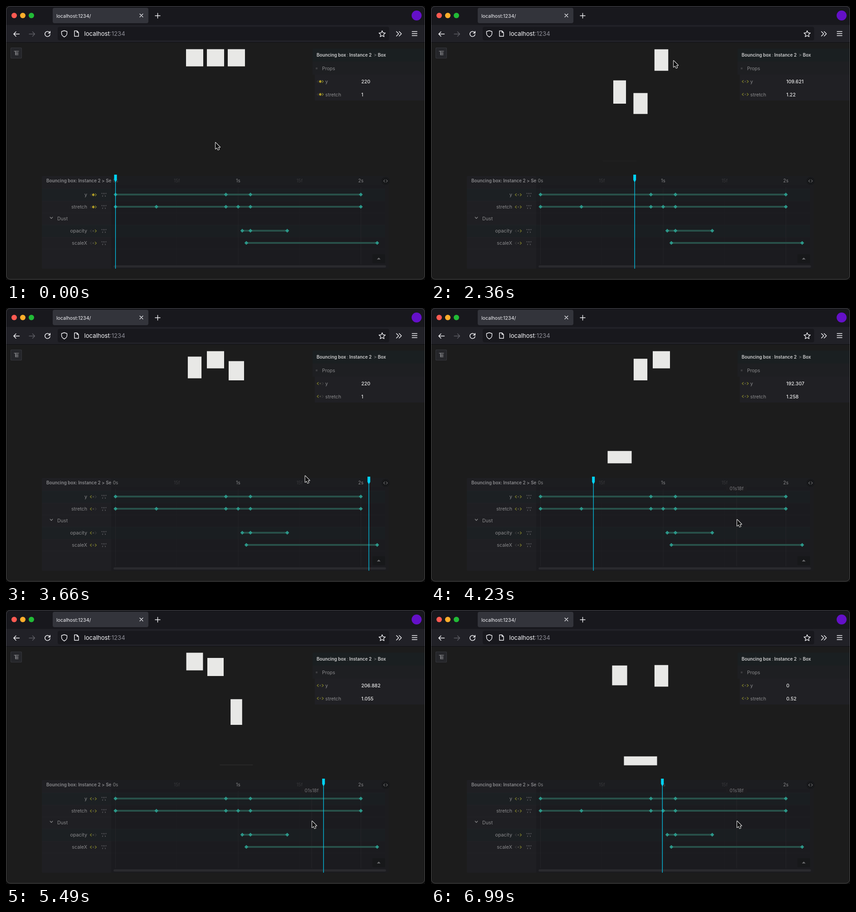
Animation of 924x606 px, one loop 7090 ms. Source, as an HTML page with a canvas:

```html
<!DOCTYPE html>
<html lang="en">
<head>
<meta charset="utf-8">
<title>Bouncing boxes</title>
<style>
  html, body { margin: 0; width: 100%; height: 100%; overflow: hidden; background: #0c0c0c; }
  canvas { display: block; }
</style>
</head>
<body>
<canvas id="stage" width="924" height="606"></canvas>
<script>
const ctx = document.getElementById('stage').getContext('2d');
const LOOP = 7090, STEP = 33.28, SEQUENCE = 2.2;
const ICON = '#f4f4f8', CYAN = '#00d4fb', TEAL = '#2c9789', LABEL = '#8b8b8d';

// ---- timing ----
function bezier([x1, y1, x2, y2], u) {
  const at = (a, b, s) => 3 * (1 - s) ** 2 * s * a + 3 * (1 - s) * s * s * b + s ** 3;
  let lo = 0, hi = 1;
  for (let i = 0; i < 24; i++) {
    const mid = (lo + hi) / 2;
    if (at(x1, x2, mid) < u) lo = mid; else hi = mid;
  }
  return at(y1, y2, lo);
}
const IN_OUT = [.5, 0, .5, 1];

// Each key: time, value, easing towards the next key.
const Y_KEYS = [[0, 220, [.588, 0, .98, .5]], [.9, 0], [1.1, 0, [.02, .5, .412, 1]], [2, 220]];
const STRETCH_KEYS = [[0, 1, [.35, .55, .65, 1]], [1 / 3, 1.26], [.9, 1.216], [1, .516],
                      [1.1, 1.65, [.2, .5, .5, 1]], [2, 1]];
const OPACITY_KEYS = [[1.0333, 0], [1.1, .12], [1.4, 0]];
const SCALE_KEYS = [[1.0667, 72], [2.1333, 112]];

function sample(keys, p) {
  if (p <= keys[0][0]) return keys[0][1];
  for (let i = 1; i < keys.length; i++) {
    const [t0, v0, ease = IN_OUT] = keys[i - 1], [t1, v1] = keys[i];
    if (p < t1) return v0 + (v1 - v0) * bezier(ease, (p - t0) / (t1 - t0));
  }
  return keys[keys.length - 1][1];
}

const boxes = [{ x: 416, start: 1067 }, { x: 462, start: 1597 }, { x: 508, start: 2095 }];
const phase = (start, t) => t < start ? 0 : (t - start) / 1000 % SEQUENCE;

const POINTER = [[0, 462, 302], [490, 462, 302], [960, 414.5, 121.5], [1130, 414.5, 121.5],
  [1550, 461, 122], [1640, 461, 122], [2060, 507, 121], [2130, 507, 121],
  [2360, 535, 121], [3090, 628, 179], [3290, 630, 184], [3930, 675, 468], [4230, 675, 468], [4500, 675, 467]];
function pointerAt(t) {
  const pick = i => sample(POINTER.map(k => [k[0], k[i]]), t);
  return [pick(1), pick(2)];
}

// ---- drawing helpers ----
function rect(x, y, w, h, color, radius = 0) {
  ctx.fillStyle = color;
  ctx.beginPath();
  ctx.roundRect(x, y, w, h, radius);
  ctx.fill();
}
function disc(x, y, r, color) {
  ctx.fillStyle = color;
  ctx.beginPath();
  ctx.arc(x, y, r, 0, 7);
  ctx.fill();
}
function stroke(d, color, width = 1.4, x = 0, y = 0) {
  ctx.save();
  ctx.translate(x, y);
  ctx.strokeStyle = color;
  ctx.lineWidth = width;
  ctx.lineCap = ctx.lineJoin = 'round';
  ctx.stroke(new Path2D(d));
  ctx.restore();
}
function fill(d, color, x = 0, y = 0) {
  ctx.save();
  ctx.translate(x, y);
  ctx.fillStyle = color;
  ctx.fill(new Path2D(d));
  ctx.restore();
}
function text(str, x, y, size, color, weight = 400, align = 'left') {
  ctx.font = `${weight} ${size}px Inter, sans-serif`;
  ctx.textAlign = align;
  ctx.fillStyle = color;
  ctx.fillText(str, x, y);
}
const diamond = (x, y, r, color) => fill(`M0 ${-r}L${r} 0 0 ${r} ${-r} 0Z`, color, x, y);

function keyControls(x, y, keys, p) {
  const tint = on => on ? '#85852a' : '#38383a';
  stroke('M-4 -2.5L-7 0 -4 2.5', tint(p > keys[0][0]), 1.2, x, y);
  stroke('M4 -2.5L7 0 4 2.5', tint(p < keys[keys.length - 1][0]), 1.2, x, y);
  if (keys.some(k => Math.abs(k[0] - p) < .001)) diamond(x, y, 3.4, '#b09c27');
  else diamond(x, y, 2, '#4b4b45');
}

// ---- parts ----
function browser() {
  rect(0, 0, 924, 606, '#0c0c0c');
  rect(0, 0, 924, 605, '#1c1c1c', 9);
  rect(0, 0, 924, 42, '#18181d', [9, 9, 0, 0]);
  rect(0, 42, 924, 38, '#212127');
  rect(0, 80, 924, 1, '#0f0f12');
  ['#ff5a52', '#ffae2b', '#21bb36'].forEach((c, i) => disc(18 + 19 * i, 21, 6, c));
  rect(103, 4, 211, 34, '#33343b', 4);
  text('localhost:1234/', 111, 25.5, 10.6, ICON);
  stroke('M-3.5 -3.5L3.5 3.5M3.5 -3.5L-3.5 3.5', ICON, 1.1, 298.5, 21);
  stroke('M-5.5 0H5.5M0 -5.5V5.5', ICON, 1.4, 334.5, 21.5);
  disc(905.5, 21, 11, '#6410c8');

  stroke('M6.5 0H-6M-1 -5L-6 0 -1 5', ICON, 1.5, 23, 62);
  stroke('M-6.5 0H6M1 -5L6 0 1 5', '#5d5d65', 1.4, 57.5, 62);
  stroke('M5.6 1A5.7 5.7 0 1 1 4 -4.2L5.6 -2.6M5.8 -6V-2H1.8', ICON, 1.5, 91.5, 62);
  rect(114, 46, 731, 30, '#18181d', 4);
  stroke('M0 -7L6 -5V-1C6 3 3 5.5 0 7C-3 5.5 -6 3 -6 -1V-5Z', ICON, 1.4, 128.5, 61.5);
  stroke('M-4.5 -6H1L4.5 -2.5V6H-4.5ZM1 -6V-2.5H4.5', ICON, 1.4, 155.5, 61);
  text('localhost', 172.5, 66, 13.2, '#fbfbfe');
  text(':1234', 172.5 + ctx.measureText('localhost').width, 66, 13.2, '#8d8d96');
  const star = Array.from({ length: 10 }, (_, i) => {
    const r = i % 2 ? 3.4 : 7.4, a = i * Math.PI / 5;
    return `${r * Math.sin(a)} ${-r * Math.cos(a)}`;
  });
  stroke(`M${star.join('L')}Z`, ICON, 1.3, 829.5, 62);
  stroke('M-5 -5L0 0 -5 5M1 -5L6 0 1 5', ICON, 1.5, 866, 61.5);
  stroke('M-5.5 -4.5H5.5M-5.5 0H5.5M-5.5 4.5H5.5', ICON, 1.4, 901, 61);

  rect(10, 92, 25, 24, '#34353a', 2);
  rect(11, 93, 23, 22, '#25262a', 2);
  stroke('M-5 -4H5M-2 -4V4M-2 -1H4M-2 1.5H4M-2 4H4', '#a0a0a3', 1, 23, 104);
}

function stageBoxes(t) {
  for (const { x, start } of boxes) {
    const p = phase(start, t);
    const width = sample(SCALE_KEYS, p);
    rect(x - width / 2, 342, width, 1.2, `rgba(232,232,230,${sample(OPACITY_KEYS, p)})`);
  }
  for (const { x, start } of boxes) {
    const p = phase(start, t), stretch = sample(STRETCH_KEYS, p);
    const bottom = 133.5 + (220 - sample(Y_KEYS, p)) * 210 / 220;
    const w = 38 / stretch, h = 38 * stretch;
    rect(x - w / 2, bottom - h, w, h, '#e8e8e6');
  }
}

function propsPanel(p) {
  rect(676, 94, 247, 29, '#1a1f21', [3, 0, 0, 0]);
  rect(676, 123, 247, 29, '#1e1f22');
  rect(681, 152, 242, 57, '#202024');
  text('Bouncing box', 685, 112, 9.8, '#cfcfd0', 600);
  text(':', 752, 112, 9.8, '#8b8b8d');
  text('Instance 2', 757, 112, 9.8, '#cfcfd0', 600);
  text('>', 811, 112, 9.8, '#8b8b8d');
  text('Box', 820, 112, 9.8, '#cfcfd0', 600);
  rect(683, 136, 4, 4, '#3a3a3d');
  text('Props', 697, 142, 10.5, LABEL);
  [['y', Y_KEYS], ['stretch', STRETCH_KEYS]].forEach(([name, keys], i) => {
    const y = 167 + 28.5 * i;
    keyControls(693, y, keys, p);
    text(name, 704, y + 4, 10.7, LABEL);
    text(String(+sample(keys, p).toFixed(3)), 783.5, y + 4, 10.6, '#ececec', 500);
  });
}

const timeX = s => 241.5 + 270.5 * s;
const ROWS = [['y', 417, Y_KEYS], ['stretch', 444, STRETCH_KEYS],
              ['opacity', 497, OPACITY_KEYS], ['scaleX', 524, SCALE_KEYS]];

function timeline(p, hover) {
  const headX = timeX(p);
  rect(79, 376, 765, 205, '#1c1c1f', 2);
  rect(79, 376, 153, 205, '#1f1f23', 2);
  rect(232, 376, 604, 205, '#1b1b1f');
  rect(232, 376, 604, 20, '#1c1d20');
  for (const y of [404, 484]) rect(79, y, 757, 27, 'rgba(26,34,36,.45)');
  for (const y of [404, 431, 457, 484, 511, 537]) rect(79, y, 757, 1, 'rgba(255,255,255,.012)');

  ctx.save();
  ctx.beginPath();
  ctx.rect(79, 376, 153, 30);
  ctx.clip();
  text('Bouncing box: Instance 2 > Sequence', 89, 390, 9.8, '#8a8a8d', 600);
  ctx.restore();

  ['0s', '15f', '1s', '15f', '2s'].forEach((label, i) => {
    const x = timeX(i / 2), major = i % 2 === 0;
    rect(x - .5, 400, 1, 171, major ? '#242428' : '#1f1f23');
    ctx.globalAlpha = Math.abs(x - headX) < 12 ? .45 : 1;
    text(label, x, 390, 10, major ? LABEL : '#38383b', 400, 'center');
    ctx.globalAlpha = 1;
  });
  if (hover) {
    rect(673.5, 405, 1, 166, '#26262a');
    rect(651, 392, 46, 14, '#1d1d20', 3);
    text('01s18f', 674, 403, 10.4, '#77777a', 400, 'center');
  }

  for (const [name, y, keys] of ROWS) {
    text(name, 179, y + 4, 10.7, LABEL, 400, 'right');
    keyControls(192.5, y + .5, keys, p);
    stroke('M-4.5 -3H4.5M-3 3Q-2 -2 0 -3Q2 -2 3 3', '#37373b', .8, 216, y + .5);
    for (const [dx, dy] of [[-4.5, -3], [0, -3], [4.5, -3], [-3, 3], [3, 3]])
      rect(216 + dx - 1, y + dy - .5, 2, 2, '#57575b');
    const first = timeX(keys[0][0]), last = timeX(keys[keys.length - 1][0]);
    rect(first, y - 2, last - first, 4, '#285049');
    for (const [s] of keys) diamond(timeX(s), y, 4.3, TEAL);
  }
  stroke('M-2.8 -1.5L0 1.5 2.8 -1.5', LABEL, 1.2, 100, 468.5);
  text('Dust', 113, 474, 10.7, LABEL);

  rect(808, 549, 28, 20, '#17181a', 2);
  fill('M-4 2L0 -2 4 2Z', '#6f6f72', 822, 558.5);
  rect(237, 573.5, 601, 5, '#2a2a2e', 2.5);
  disc(837, 387, 9, '#17181a');
  stroke('M-1.5 -2.5L-4.5 0 -1.5 2.5M1.5 -2.5L4.5 0 1.5 2.5', '#8b8b8d', 1, 837, 387);

  rect(headX - .6, 384, 1.2, 197, CYAN);
  fill('M-3 0H3V11.5L1 15.5H-1L-3 11.5Z', CYAN, headX, 373);
}

function pointer([x, y]) {
  const arrow = 'M0 0V14L3.3 11 5.6 16.2 8 15.2 5.8 10.2H10Z';
  stroke(arrow, '#f2f2f2', 2, x, y);
  fill(arrow, '#111', x, y);
}

function draw(time) {
  const t = 1100 + Math.min(177, Math.floor((time - 1090) / STEP)) * STEP;
  const p = phase(boxes[1].start, t), position = pointerAt(t);
  browser();
  stageBoxes(t);
  propsPanel(p);
  timeline(p, position[1] > 400);
  ctx.strokeStyle = 'rgba(255,255,255,.2)';
  ctx.lineWidth = 1;
  ctx.beginPath();
  ctx.roundRect(.5, .5, 923, 604, 9);
  ctx.stroke();
  pointer(position);
}

const began = performance.now();
function tick() {
  draw((performance.now() - began) % LOOP);
  requestAnimationFrame(tick);
}
tick();
</script>
</body>
</html>
```
